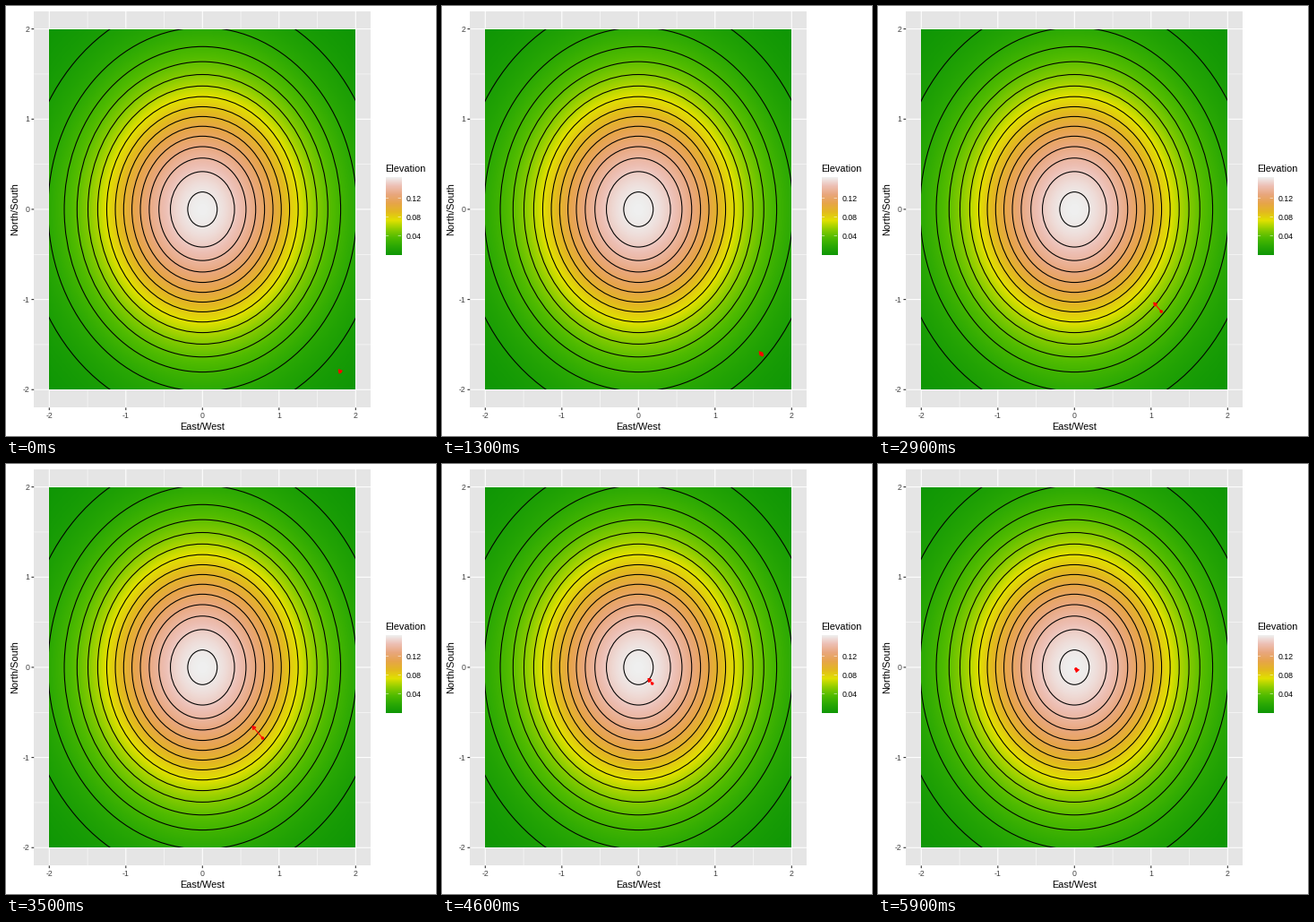
Animation of 480 by 480 pixels, one loop 6000 ms. Source, as a matplotlib script:

```python
import numpy as np
import matplotlib.pyplot as plt
from matplotlib.animation import FuncAnimation
from matplotlib.colors import LinearSegmentedColormap
from matplotlib.patches import Circle, Ellipse, Polygon, Rectangle

plt.rcParams["font.family"] = "Liberation Sans"

SIZE, DPI, FRAMES = 480, 80, 60
PT = 72 / DPI                       # points per pixel
CX, CY, UX, UY = 219.3, 226.95, 85.5, 100.66
LEFT, RIGHT, TOP, BOTTOM = 31.2, 407.4, 5.5, 448.4
RED = "#ff0000"
TERRAIN = ["#109706", "#2aa804", "#50bb00", "#90ce00", "#e1e100",
           "#e3b820", "#e7a44b", "#e9a77d", "#edbfb4", "#efefef"]
cmap = LinearSegmentedColormap.from_list("terrain10", TERRAIN, N=512)


def density(x, y):
    return np.exp(-(x**2 + y**2) / 2) / (2 * np.pi)


def px(x):
    return CX + UX * x


def py(y):
    return CY - UY * y


Z_MAX, Z_MIN = density(0, 0), density(2, 2)

fig = plt.figure(figsize=(SIZE / DPI, SIZE / DPI), dpi=DPI, facecolor="white")
ax = fig.add_axes([0, 0, 1, 1])
ax.axis("off")


def line(xs, ys, color, width, z):
    ax.plot(xs, ys, color=color, lw=width * PT, zorder=z,
            solid_capstyle="butt", snap=False)


def text(x, y, label, size, color="black", ha="center", **kw):
    ax.text(x, y, label, fontsize=size * PT, color=color, ha=ha,
            va="baseline", zorder=9, **kw)


# Panel and grid
ax.add_patch(Rectangle((LEFT, TOP), RIGHT - LEFT, BOTTOM - TOP,
                       fc="#e5e5e5", ec="none", zorder=0))
for v in np.arange(-1.5, 2, 1):
    line([px(v)] * 2, [TOP, BOTTOM], "white", 0.53, 1)
    line([LEFT, RIGHT], [py(v)] * 2, "white", 0.53, 1)
for v in range(-2, 3):
    line([px(v)] * 2, [TOP, BOTTOM], "white", 1.07, 1)
    line([LEFT, RIGHT], [py(v)] * 2, "white", 1.07, 1)
    line([px(v)] * 2, [BOTTOM, BOTTOM + 2.75], "#2b2b2b", 1.07, 1)
    line([LEFT - 2.75, LEFT], [py(v)] * 2, "#2b2b2b", 1.07, 1)
    text(px(v), 460, str(v), 8.8, "#424242")
    text(26.3, py(v) + 3.2, str(v), 8.8, "#424242", ha="right")
text(CX, 473, "East/West", 11)
text(13.5, CY, "North/South", 11, rotation=90, rotation_mode="anchor")

# Elevation surface
x0, x1, y0, y1 = 48, 390, 26, 428
gx = (np.arange(x0, x1) + 0.5 - CX) / UX
gy = (CY - np.arange(y0, y1) - 0.5) / UY
ax.imshow(density(gx[None, :], gy[:, None]), cmap=cmap, vmin=Z_MIN, vmax=Z_MAX,
          extent=(x0, x1, y1, y0), interpolation="nearest", aspect="auto", zorder=2)

# Contours: fifteen equal steps of height
field = Rectangle((px(-2), py(2)), 4 * UX, 4 * UY, transform=ax.transData)
for k in range(1, 16):
    level = k * (Z_MAX - Z_MIN) / 15
    r = np.sqrt(-2 * np.log(level * 2 * np.pi))
    ring = Ellipse((CX, CY), 2 * r * UX, 2 * r * UY, fill=False,
                   ec="black", lw=1.07 * PT, zorder=3)
    ax.add_patch(ring)
    ring.set_clip_path(field)

# Legend
bx0, bx1, by0, by1 = 423.7, 441, 192, 278.3
ax.imshow(np.linspace(Z_MAX, Z_MIN, 256)[:, None], cmap=cmap, vmin=Z_MIN, vmax=Z_MAX,
          extent=(bx0, bx1, by1, by0), interpolation="bilinear", aspect="auto", zorder=2)
text(bx0 - 0.2, 185.3, "Elevation", 11, ha="left")
for v in (0.04, 0.08, 0.12):
    t = (v - Z_MIN) / (Z_MAX - Z_MIN)
    y = by1 - (by1 - by0) * (0.025 + 0.95 * t)
    line([bx0, bx0 + 3.4], [y, y], "white", 0.5, 4)
    line([bx1 - 3.4, bx1], [y, y], "white", 0.5, 4)
    text(446.3, y + 3.5, f"{v:.2f}", 8.8, ha="left")

ax.set_xlim(0, SIZE)
ax.set_ylim(SIZE, 0)


# Gradient ascent with unit rate
def gradient(p):
    return -p * density(*p)


path = [np.array([1.8, -1.8])]
for _ in range(FRAMES - 1):
    path.append(path[-1] + gradient(path[-1]))

dot = ax.add_patch(Circle((0, 0), 1.77, fc=RED, ec="none", zorder=6))
shaft, = ax.plot([], [], color=RED, lw=1.07 * PT, solid_capstyle="butt", zorder=6)
head = ax.add_patch(Polygon(np.zeros((3, 2)), closed=True, fc=RED, ec=RED,
                            lw=1.07 * PT, joinstyle="miter", zorder=6))
HEAD = 4.25


def update(i):
    p = path[i]
    q = p + 2 * gradient(p)
    tail = np.array([px(p[0]), py(p[1])])
    tip = np.array([px(q[0]), py(q[1])])
    back = np.arctan2(*(tail - tip)[::-1])
    wings = [tip + HEAD * np.array([np.cos(a), np.sin(a)])
             for a in (back - np.pi / 6, back + np.pi / 6)]
    dot.center = tuple(tail)
    shaft.set_data([tail[0], tip[0]], [tail[1], tip[1]])
    head.set_xy([wings[0], tip, wings[1]])
    return dot, shaft, head


anim = FuncAnimation(fig, update, frames=FRAMES, interval=100, repeat=True,
                     repeat_delay=0, blit=False)
plt.show()
```
